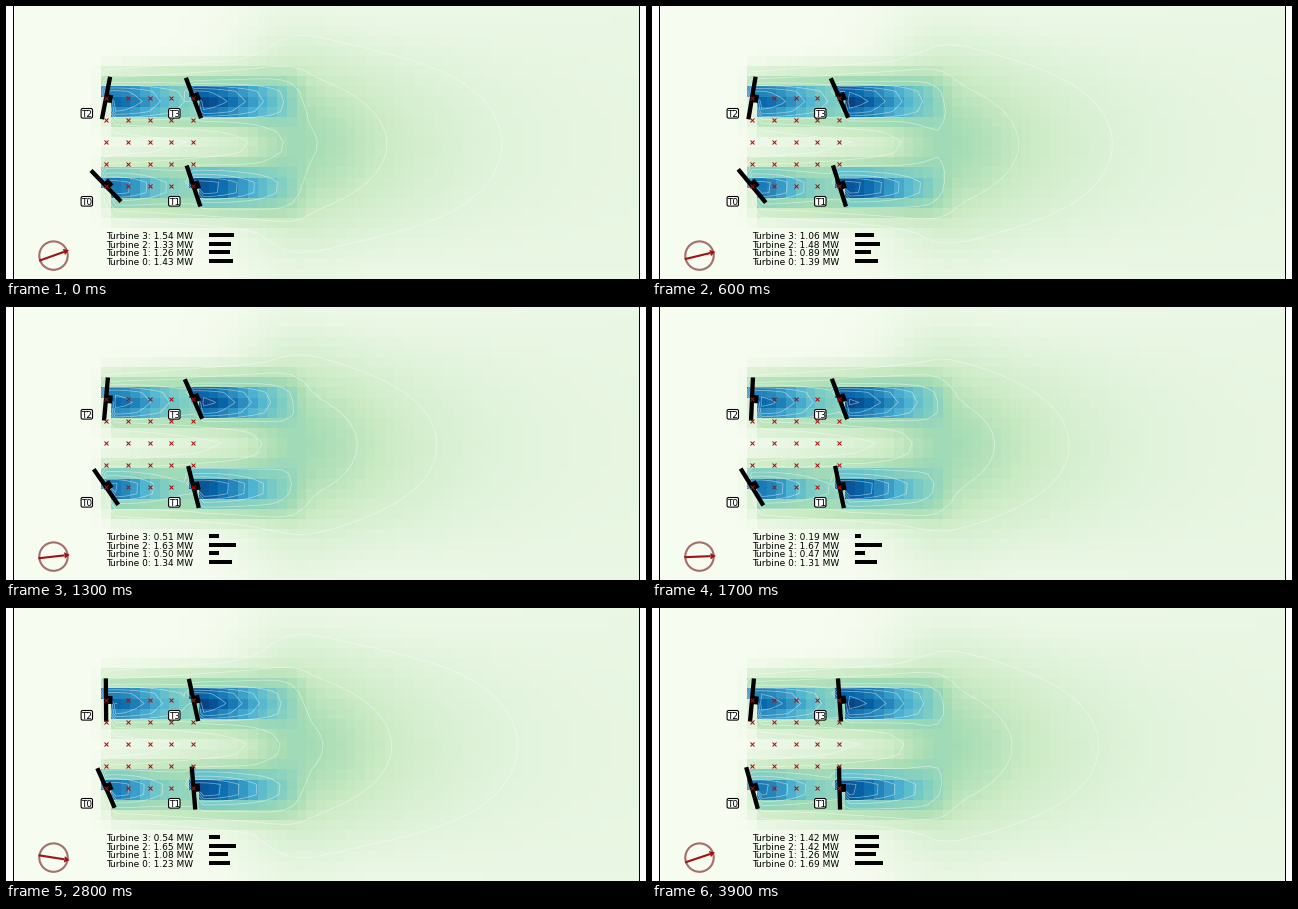
A matplotlib script for the animation above (4 s loop, 640 by 273 pixels).

```python
import numpy as np
import matplotlib.pyplot as plt
from matplotlib.animation import FuncAnimation
from matplotlib.patches import Circle, FancyBboxPatch, Polygon, Rectangle

W, H, DPI = 640, 273, 128
FRAMES, STEP = 40, 100
PT = 72 / DPI  # points per pixel
RED = "#a01214"

# Turbine hubs in pixels, numbered from the lower left
HUBS = [(100, 180), (187.5, 180), (100, 92), (187.5, 92)]

# Flow grid in pixels
LEFT, RIGHT, TOP, BOTTOM = 7, 633, -0.7, 272.6
NX, NY = 64, 27
DX, DY = (RIGHT - LEFT) / NX, (BOTTOM - TOP) / NY
xs = LEFT + DX * (np.arange(NX) + 0.5)
ys = TOP + DY * (np.arange(NY) + 0.5)
X, Y = np.meshgrid(xs, ys)


def yaws(u):
    """Rotor angles in degrees, u runs from 0 to 1 over the loop."""
    return (-44 + 28.4 * u,
            -10 - 8.5 * np.cos(np.pi * u),
            5.2 + 5.8 * np.cos(1.5 * np.pi * u),
            np.interp(u, [0, 0.26, 1], [-20.6, -26, -4]))


def powers(u):
    return (np.interp(u, [0, 0.87, 1], [1.43, 1.19, 1.69]),
            0.9 + 0.44 * np.cos(2 * np.pi * (u - 0.9)),
            1.33 + 0.36 * np.sin(0.92 * np.pi * u),
            np.interp(u, [0, 0.44, 0.72, 1], [1.54, 0.18, 0.54, 1.42]))


def wind_angle(t):
    return 19.6 - 10.2 * (t % 3800) / 1000


def sigmoid(z):
    return 1 / (1 + np.exp(-z))


def wet(x0, dy):
    """Cells behind a rotor; its upper half starts one column earlier."""
    return (X > x0) | ((X > x0 - DX) & (dy < -4))


def core(x0, dy, half, amp, length):
    shape = np.exp(-((X - x0) / length) ** 2 - (dy / half) ** 4)
    return amp * shape * wet(x0, dy)


def row_wake(yc, half, front, rear):
    """Wake of two turbines standing one behind the other."""
    dy = Y - yc
    width = 30 + 0.06 * (X - 105)
    amp = 0.39 + 0.0004 * (X - 105)
    gate = np.where(wet(105, dy), 1, 0.3 * (X > 95) + 0.1 * (X > 85))
    tail = amp * gate * np.exp(-np.abs(dy / width) ** 3)
    return tail + core(105, dy, half, *front) + core(193, dy, half, *rear)


def flow(u):
    pulse = 1 + 0.05 * np.sin(4 * np.pi * u)
    sway = 1 + 0.05 * np.cos(4 * np.pi * u)
    near = (row_wake(95, 15, (0.48, 55 * pulse), (0.53, 60 * sway))
            + row_wake(181, 14, (0.43, 42 * sway), (0.51, 55 * pulse)))
    near *= 1 - sigmoid((X - 302) / 12)

    axis = 0.08 + 0.36 * np.exp(-(np.maximum(X - 285, 0) / 120) ** 1.3)
    spread = 102 + 0.0018 * np.maximum(X - 320, 0) ** 2
    far = axis * np.exp(-((Y - 138) / spread) ** 2) * sigmoid((X - 245) / 22)
    return (near ** 4 + far ** 4) ** 0.25


def contour_levels(t):
    levels = 0.125 * (np.arange(8) + t / 3000)
    return levels[(levels > 0.085) & (levels < 0.96)]


fig = plt.figure(figsize=(W / DPI, H / DPI), dpi=DPI, facecolor="white")
ax = fig.add_axes([0, 0, 1, 1])
image = ax.imshow(flow(0), cmap="GnBu", vmin=0, vmax=1, aspect="auto",
                  interpolation="nearest", extent=(LEFT, RIGHT, BOTTOM, TOP))
ax.set_xlim(0, W)
ax.set_ylim(H, 0)
ax.axis("off")
for x in (LEFT, RIGHT):
    ax.plot([x, x], [-2, H + 2], color="black", lw=PT, zorder=3)


def thick_line(width):
    return ax.plot([], [], color="black", lw=width * PT,
                   solid_capstyle="butt", zorder=4)[0]


def label(x, y, text, **kw):
    return ax.text(x, y, text, family="DejaVu Sans", fontsize=9 * PT,
                   color="black", va="baseline", zorder=7, **kw)


rotors = [thick_line(4.3) for _ in HUBS]
nacelles = [thick_line(8) for _ in HUBS]
readouts, bars = [], []
for i, (hx, hy) in enumerate(HUBS):
    bx, by = hx - 19.2, hy + 15.3
    ax.add_patch(FancyBboxPatch((bx - 5.5, by - 4.6), 11, 9.2,
                                boxstyle="round,pad=0.2,rounding_size=1.6",
                                fc="white", ec="black", lw=1.1 * PT, zorder=6))
    label(bx, by + 3.4, f"T{i}", ha="center")
    readouts.append(label(100.3, 259.1 - 8.75 * i, ""))
    bar = Rectangle((203, 252.9 - 8.7 * i), 0, 4.2, fc="black", lw=0, zorder=5)
    bars.append(ax.add_patch(bar))

sx, sy = np.meshgrid(100.15 + 21.73 * np.arange(5), 92.3 + 21.95 * np.arange(5))
ax.plot(sx.ravel(), sy.ravel(), "x", color=RED, ms=4.2 * PT, mew=PT, zorder=5)

DIAL = np.array([47.5, 249.6])
ax.add_patch(Circle(DIAL, 14.2, fill=False, ec="#a66f6b", lw=2.1 * PT, zorder=5))
needle, = ax.plot([], [], color=RED, lw=2.1 * PT, zorder=6,
                  solid_capstyle="butt")
tip = ax.add_patch(Polygon(np.zeros((3, 2)), fc=RED, lw=0, zorder=6))

contours = None


def draw_turbine(i, yaw):
    a = np.radians(yaw)
    hx, hy = HUBS[i]
    dx, dy = 21.6 * np.sin(a), -21.6 * np.cos(a)
    rotors[i].set_data([hx - dx, hx + dx], [hy - dy, hy + dy])
    nacelles[i].set_data([hx, hx + 6.5 * np.cos(a)],
                         [hy, hy + 6.5 * np.sin(a)])


def draw_wind(t):
    a = np.radians(wind_angle(t))
    along = np.array([np.cos(a), -np.sin(a)])
    across = np.array([np.sin(a), np.cos(a)])
    tail, neck, head = (DIAL + r * along for r in (-15.2, 11, 16.3))
    needle.set_data([tail[0], neck[0]], [tail[1], neck[1]])
    tip.set_xy([head, neck + 3.2 * across, neck - 3.2 * across])


def update(frame):
    global contours
    t = frame * STEP
    u = frame / (FRAMES - 1)
    field = flow(u)
    image.set_data(field)
    if contours is not None:
        contours.remove()
    contours = ax.contour(xs, ys, field, levels=contour_levels(t),
                          colors="white", alpha=0.45, linewidths=0.8 * PT,
                          zorder=2)
    for i, (yaw, power) in enumerate(zip(yaws(u), powers(u))):
        draw_turbine(i, yaw)
        readouts[i].set_text(f"Turbine {i}: {power:.2f} MW")
        bars[i].set_width(3 + 14.6 * power)
    draw_wind(t)
    return []


anim = FuncAnimation(fig, update, frames=FRAMES, interval=STEP,
                     init_func=lambda: update(0), repeat=True, repeat_delay=0,
                     blit=False)
plt.show()
```
